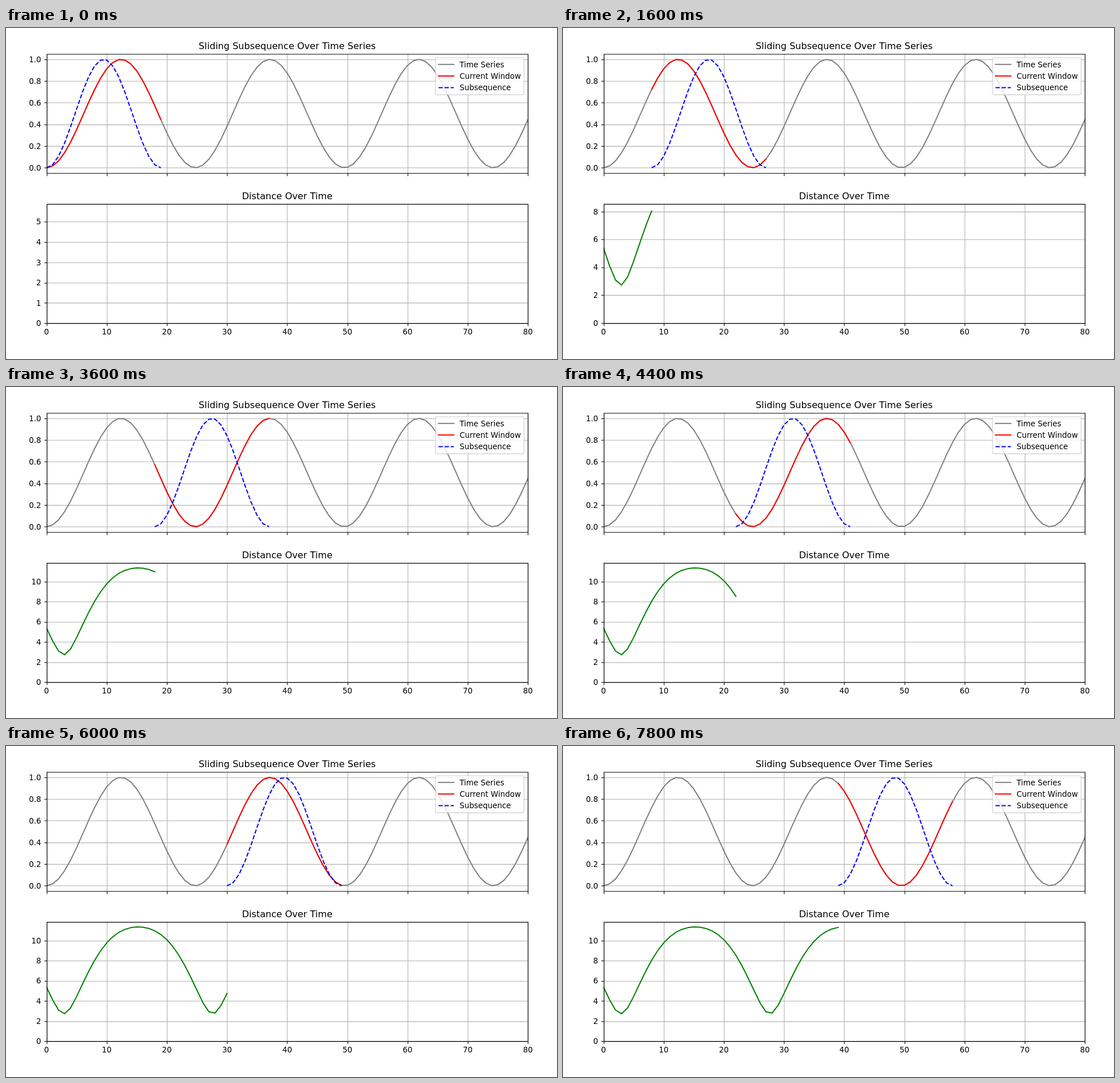
Recreate the animation shown at these times as an HTML page. Size 966 by 580 pixels, loop 8000 ms.

```html
<!DOCTYPE html>
<html lang="en">
<head>
<meta charset="utf-8">
<title>Sliding Subsequence</title>
<style>
  html, body { margin: 0; width: 100%; height: 100%; overflow: hidden; background: #fff; }
  svg { display: block; width: 966px; height: 580px; }
  text { font: 13.89px "DejaVu Sans", sans-serif; fill: #000; }
  .title { font-size: 16.67px; text-anchor: middle; }
  .x { text-anchor: middle; }
  .y { text-anchor: end; }
  path { fill: none; }
  .grid { stroke: #b0b0b0; stroke-width: 1.11; }
  .axis { stroke: #000; stroke-width: 1.11; }
  .line { stroke-width: 2.08; stroke-linecap: square; stroke-linejoin: round; }
  .dash { stroke-linecap: butt; stroke-dasharray: 7.71 3.33; }
</style>
</head>
<body>
<svg id="stage" viewBox="0 0 1000 600" preserveAspectRatio="none"></svg>
<script>
const svg = document.getElementById('stage');
const STEP_MS = 200, STEPS = 40, WINDOW = 20, SCALE = 3.828;
const LEFT = 73.5, RIGHT = 947.2;
const upper = { top: 47, bottom: 263.1, min: -0.05, max: 1.05 };
const lower = { top: 318.9, bottom: 535, min: 0, max: 1 };

function add(tag, attrs, parent = svg, text) {
  const el = document.createElementNS('http://www.w3.org/2000/svg', tag);
  for (const k in attrs) el.setAttribute(k, attrs[k]);
  if (text !== undefined) el.textContent = text;
  parent.appendChild(el);
  return el;
}

const range = (n, fn) => Array.from({ length: n }, (_, k) => fn(k));
const wave = (k, period) => (1 - Math.cos(2 * Math.PI * k / period)) / 2;
const series = range(100, k => wave(k, 99 / 4));
const pattern = range(WINDOW, k => wave(k, WINDOW - 1));
const distances = range(STEPS, i =>
  SCALE * Math.hypot(...pattern.map((v, k) => series[i + k] - v)));

const snap = v => Math.floor(v + 0.5) + 0.5;
const px = x => LEFT + (RIGHT - LEFT) * x / 80;
const py = (ax, v) => ax.bottom - (ax.bottom - ax.top) * (v - ax.min) / (ax.max - ax.min);
const curve = (ax, values, start = 0) => values.map((v, k) =>
  (k ? 'L' : 'M') + px(start + k).toFixed(2) + ' ' + py(ax, v).toFixed(2)).join('');

function drawYTicks(ax, values, digits) {
  ax.yTicks.replaceChildren();
  for (const v of values) {
    const y = snap(py(ax, v));
    add('path', { class: 'grid', d: `M${LEFT} ${y}H${RIGHT}` }, ax.yTicks);
    add('path', { class: 'axis', d: `M${snap(LEFT)} ${y}h-4.86` }, ax.yTicks);
    add('text', { class: 'y', x: LEFT - 9.72, y: py(ax, v) + 5.1 }, ax.yTicks, v.toFixed(digits));
  }
}

function buildAxes(ax, id, title, labelled) {
  const clip = add('clipPath', { id });
  add('rect', { x: LEFT, y: ax.top, width: RIGHT - LEFT, height: ax.bottom - ax.top }, clip);
  for (let x = 0; x <= 80; x += 10) {
    const sx = snap(px(x));
    add('path', { class: 'grid', d: `M${sx} ${ax.top}V${ax.bottom}` });
    add('path', { class: 'axis', d: `M${sx} ${snap(ax.bottom)}v4.86` });
    if (labelled) add('text', { class: 'x', x: px(x), y: ax.bottom + 20.3 }, svg, x);
  }
  ax.yTicks = add('g', {});
  ax.plot = add('g', { 'clip-path': `url(#${id})` });
  const l = snap(LEFT), r = snap(RIGHT), t = snap(ax.top), b = snap(ax.bottom);
  add('path', { class: 'axis', d: `M${l} ${t}H${r}V${b}H${l}Z` });
  add('text', { class: 'title', x: (LEFT + RIGHT) / 2, y: ax.top - 8.33 }, svg, title);
}

buildAxes(upper, 'clipUpper', 'Sliding Subsequence Over Time Series', false);
buildAxes(lower, 'clipLower', 'Distance Over Time', true);
drawYTicks(upper, range(6, k => k / 5), 1);

const addLine = (ax, color, extra = '') => add('path', { class: 'line ' + extra, stroke: color }, ax.plot);
addLine(upper, '#808080').setAttribute('d', curve(upper, series));
const windowLine = addLine(upper, '#f00');
const patternLine = addLine(upper, '#00f', 'dash');
const distanceLine = addLine(lower, '#008000');

add('rect', {
  x: 779.5, y: 54, width: 160.8, height: 67, rx: 2.78,
  fill: '#fff', stroke: '#ccc', 'stroke-width': 1.39, opacity: 0.8
});
[['Time Series', '#808080', ''], ['Current Window', '#f00', ''], ['Subsequence', '#00f', 'dash']]
  .forEach(([label, color, extra], k) => {
    const y = 66 + 21 * k;
    add('path', { class: 'line ' + extra, stroke: color, d: `M785 ${y}h27.8` });
    add('text', { x: 823.2, y: y + 5 }, svg, label);
  });

function draw(i) {
  const shown = distances.slice(0, i + 1);
  windowLine.setAttribute('d', curve(upper, series.slice(i, i + WINDOW), i));
  patternLine.setAttribute('d', curve(upper, pattern, i));
  lower.max = Math.max(...shown) + 0.5;
  const step = lower.max > 7 ? 2 : 1;
  drawYTicks(lower, range(Math.floor(lower.max / step) + 1, k => k * step), 0);
  distanceLine.setAttribute('d', curve(lower, shown));
}

let start, last = 0;
function tick(now) {
  start ??= now;
  const i = Math.floor((now - start) / STEP_MS) % STEPS;
  if (i !== last) draw(last = i);
  requestAnimationFrame(tick);
}
draw(0);
requestAnimationFrame(tick);
</script>
</body>
</html>
```
